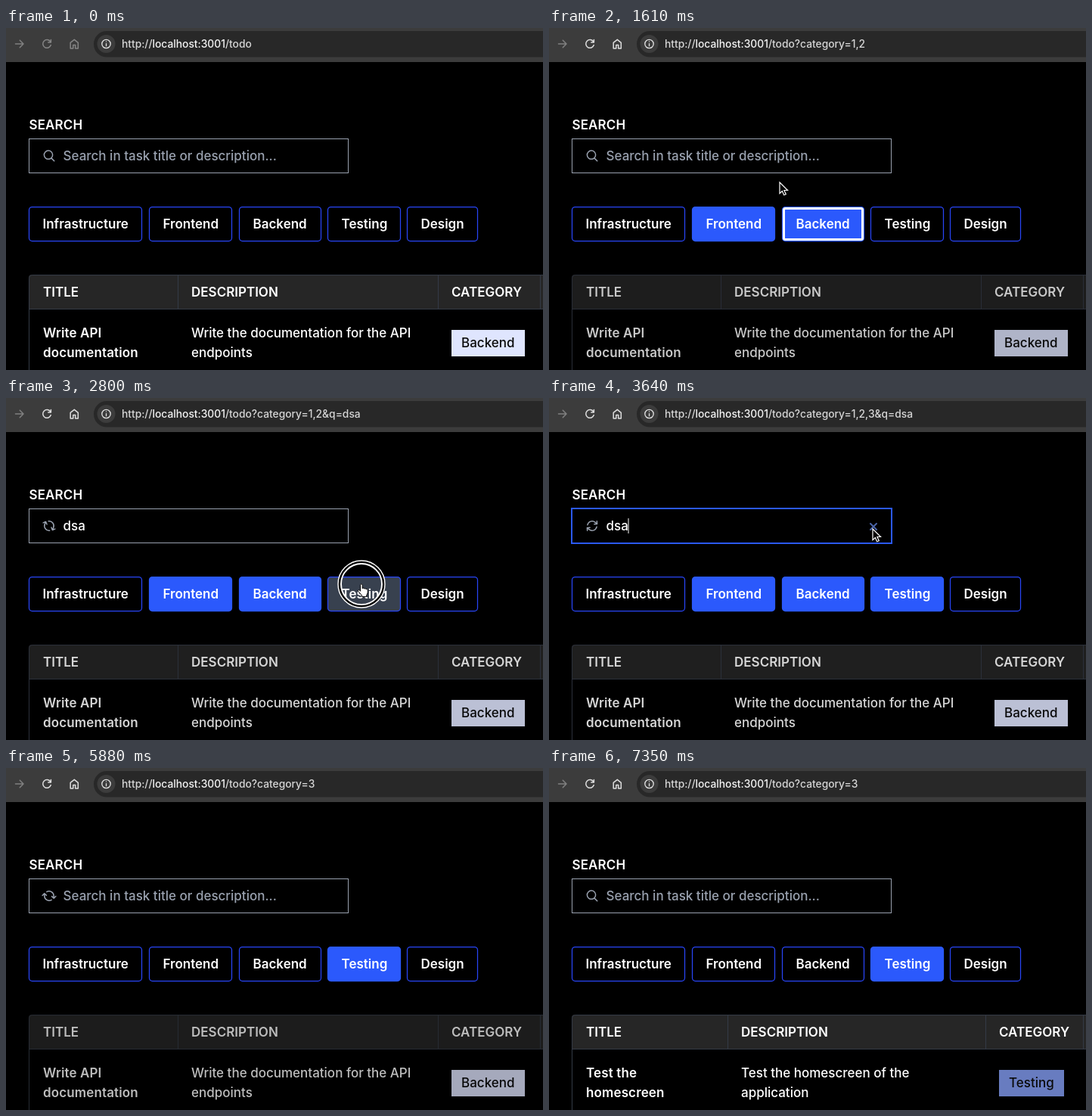
Animation of 710 by 452 pixels, one loop 8540 ms. Source, as an HTML page:

```html
<!DOCTYPE html>
<html lang="en">
<head>
<meta charset="utf-8">
<title>Todo filters</title>
<style>
  html, body { margin: 0; width: 100%; height: 100%; overflow: hidden; background: #000; }
  svg { display: block; width: 710px; height: 452px; }
  text { font: 500 17px Inter, sans-serif; fill: #fff; white-space: pre; }
  .url { font-size: 13.8px; fill: #d6d6d6; }
  .strong { font-weight: 600; }
  .bold { font-weight: 600; letter-spacing: .13px; }
  .hint { fill: #99a1af; }
  .line { fill: none; stroke-linecap: round; stroke-linejoin: round; }
</style>
</head>
<body>
<svg id="stage" viewBox="0 0 710 452">
  <rect width="710" height="45" fill="#3c3c3c"/>
  <rect x="116" y="4" width="640" height="34.5" rx="17.2" fill="#282828"/>
  <circle cx="132.5" cy="21" r="12" fill="#3c3c3c"/>
  <g class="line" stroke="#e3e3e3" stroke-width="1.3">
    <circle cx="132.5" cy="21" r="5.7"/>
    <path d="M132.5 20.6v3.2M132.5 18v.1"/>
  </g>
  <path class="line" stroke="#808080" stroke-width="1.5" d="M12.5 21h10.5M18.3 16.3l4.7 4.7-4.7 4.7"/>
  <g id="nav" class="line" stroke-width="1.5">
    <path d="M58.7 18A5.4 5.4 0 1 0 59.3 22.6M59.4 15.4v3.6h-3.6"/>
    <path d="M85.2 19.3v7.7h3.6v-4.6h2.9v4.6h3.6v-7.7l-5-4z"/>
  </g>
  <text class="url" x="153" y="26">http://<tspan fill="#f4f4f4">localhost:3001</tspan>/todo<tspan id="query"></tspan></text>

  <text class="bold" x="30.5" y="134">SEARCH</text>
  <rect id="field" fill="#000"/>
  <g class="line" stroke="#99a1af" stroke-width="2">
    <path id="lens" transform="translate(48 160) scale(.75)" d="m21 21-5.2-5.2A7.5 7.5 0 1 0 5.2 5.2a7.5 7.5 0 0 0 10.6 10.6"/>
    <path id="spinner" d="M16 9.35h5v-5M3 19.65v-5h5M3 14.65l3.2 3.2a8.25 8.25 0 0 0 13.8-3.7M4 9.85a8.25 8.25 0 0 1 13.8-3.7l3.2 3.2"/>
  </g>
  <text id="hint" class="hint" x="75.5" y="175">Search in task title or description...</text>
  <text id="typed" x="75.5" y="175"></text>
  <rect id="caret" y="159" width="1" height="20" fill="#fff"/>
  <path id="clear" class="line" stroke="#4a64a8" stroke-width="2" d="M425 166l8 8M433 166l-8 8"/>

  <g id="buttons"></g>
  <g id="table"></g>

  <g id="ring" fill="none">
    <circle r="29" stroke="#000" stroke-width="5"/>
    <circle r="31" stroke="#fff" stroke-width="1.4"/>
    <circle r="27" stroke="#fff" stroke-width="1.9"/>
  </g>
  <g id="pointer">
    <path id="arrow" d="M0 0v14.6l3.3-3.1 2.4 5.3 2.6-1.1-2.4-5.2h4.6z" fill="#000" stroke="#fff" stroke-width="1.2"/>
    <path id="hand" d="M-1.4 1.2C-1.4-.6 1.2-.6 1.2 1.2v4.6c.5-1 2.3-.9 2.5.4.7-.8 2.2-.5 2.4.6.9-.6 2.2 0 2.2 1.2 0 3.4-.2 4.6-1.6 6.6v2H.6v-1.6L-4.2 9.6c-.9-1.5.6-2.6 1.7-1.5l1.1 1.2z" fill="#fff" stroke="#000" stroke-width="1"/>
    <path id="beam" class="line" d="M-3-8q3 0 3 2.5V5.5q0 2.5-3 2.5M3-8q-3 0-3 2.5M0 5.5q0 2.5 3 2.5" stroke="#fff" stroke-width="1.3"/>
  </g>
</svg>
<script>
const LOOP = 8540, STEP = 70, PULSE = 2100, SPIN = 1050;
const LOAD_START = 1120, SPIN_START = 2380, LOADED = 7350;
const BLUE = '#2b59fc', OUTLINE = '#2845f6';
const $ = id => document.getElementById(id);
const set = (el, attrs) => { for (const k in attrs) el.setAttribute(k, attrs[k]); };
const show = (el, on) => set(el, { visibility: on ? 'visible' : 'hidden' });

function add(parent, tag, attrs, label) {
  const el = document.createElementNS('http://www.w3.org/2000/svg', tag);
  set(el, attrs);
  if (label) el.textContent = label;
  return parent.appendChild(el);
}

// Each entry holds from its time until the next one.
const queries = [[0, ''], [1050, '?category=1'], [1400, '?category=1,2'],
  [2590, '?category=1,2&q=dsa'], [2940, '?category=1,2,3&q=dsa'],
  [3990, '?category=1,2,3'], [4830, '?category=2,3'], [5250, '?category=3']];
const typing = [[0, ''], [2100, 'd'], [2240, 'ds'], [2310, 'dsa'], [3850, '']];
const focuses = [[0, ''], [910, 1], [1260, 2], [1820, 'field'], [2730, 3],
  [3430, 'field'], [4410, 1], [5040, 2]];
const clicks = [[560, 700], [910, 1050], [1260, 1400], [1820, 1960], [2730, 2870],
  [3430, 3500], [3780, 3920], [4410, 4480], [5040, 5180]];
const path = [[210, 338, 448], [560, 254, 256], [1050, 254, 256], [1260, 348, 256],
  [1400, 346, 252], [1610, 305, 204], [1750, 262, 172], [2380, 262, 172],
  [2730, 470, 246], [2940, 470, 246], [3360, 404, 172], [3500, 410, 172],
  [3640, 428, 173], [3920, 428, 173], [4340, 268, 256], [4480, 276, 254],
  [4760, 295, 252], [4970, 352, 256], [5180, 352, 256], [5320, 352, 429]];

const entryAt = (list, t) => list.filter(e => e[0] <= t).pop();
const at = (list, t) => entryAt(list, t)[1];

function pointAt(t) {
  const i = path.findIndex(p => p[0] > t);
  if (i < 1) return (i ? path[path.length - 1] : path[0]).slice(1);
  const [a, b] = [path[i - 1], path[i]];
  const p = (t - a[0]) / (b[0] - a[0]);
  const e = p * p * (3 - 2 * p);
  return [a[1] + (b[1] - a[1]) * e, a[2] + (b[2] - a[2]) * e];
}

const buttons = [['Infrastructure', 30, 150], ['Frontend', 189, 110], ['Backend', 308, 109],
  ['Testing', 425, 97], ['Design', 530, 94]].map(([label, x, w]) => {
  const g = $('buttons');
  const box = add(g, 'rect', { x: x + .5, y: 236.5, width: w - 1, height: 45, rx: 4, 'stroke-width': 1.25 });
  const focus = add(g, 'rect', { x: x + 2.5, y: 238.5, width: w - 5, height: 41, rx: 2,
    fill: 'none', stroke: '#fff', 'stroke-width': 3 });
  add(g, 'text', { class: 'strong', x: x + 18.5, y: 265 }, label);
  return { x, w, box, focus };
});

function makeTable(cols, title, text, tag, tagWidth, tagFill) {
  const g = add($('table'), 'g', {});
  const edge = { fill: 'none', stroke: '#343a46' };
  add(g, 'path', { d: 'M30 372v-42q0-4 4-4H710v46z', fill: '#262626' });
  add(g, 'path', { ...edge, d: 'M30.5 452V330.5q0-4 4-4H710M31 371.5H710' });
  for (const x of [cols[0] - 17.5, cols[1] - 17.5, 706.5])
    add(g, 'path', { ...edge, d: `M${x} 327v44` });
  ['TITLE', 'DESCRIPTION', 'CATEGORY'].forEach((label, i) =>
    add(g, 'text', { class: 'strong', x: [49, ...cols][i], y: 355 }, label));
  title.forEach((s, i) => add(g, 'text', { class: 'bold', x: 49, y: 409 + 26 * i }, s));
  text.forEach((s, i) => add(g, 'text', { x: cols[0], y: 409 + 26 * i }, s));
  add(g, 'rect', { x: cols[1], y: 399, width: tagWidth, height: 35, fill: tagFill });
  add(g, 'text', { x: cols[1] + 13, y: 422, style: 'fill:#0a0a0a' }, tag);
  return g;
}
const before = makeTable([245, 589], ['Write API', 'documentation'],
  ['Write the documentation for the API', 'endpoints'], 'Backend', 97, '#dfe5fe');
const after = makeTable([254, 595], ['Test the', 'homescreen'],
  ['Test the homescreen of the', 'application'], 'Testing', 86, '#687cc0');

function drawPointer(t, x, y, over) {
  const transform = `translate(${x.toFixed(1)} ${y.toFixed(1)})`;
  const visible = t >= 210 && t < 5390 && !(t >= 2100 && t < 2450);
  const inField = x > 30 && x < 453 && y > 146 && y < 192;
  const onClear = inField && x > 423 && x < 435;
  const kind = over >= 0 ? 'hand' : inField && !onClear ? 'beam' : 'arrow';
  for (const id of ['arrow', 'hand', 'beam']) show($(id), visible && id === kind);
  set($('pointer'), { transform });
  set($('ring'), { transform });
  show($('ring'), clicks.some(([a, b]) => t >= a && t < b));
}

function drawField(t, focused, since) {
  const value = at(typing, t);
  set($('field'), focused
    ? { x: 30, y: 146, width: 423, height: 46, stroke: BLUE, 'stroke-width': 2 }
    : { x: 30.5, y: 146.5, width: 422, height: 45, stroke: '#99a1af', 'stroke-width': 1 });
  $('typed').textContent = value;
  show($('hint'), !value);
  show($('clear'), focused && value);
  show($('caret'), focused && (t - since) % 1050 < 525);
  set($('caret'), { x: Math.round(75.5 + $('typed').getComputedTextLength()) - .5 });
  const spinning = t >= SPIN_START && t < LOADED;
  show($('lens'), !spinning);
  show($('spinner'), spinning);
  const angle = (t - 3640) / SPIN * 360 - 4;
  set($('spinner'), { transform: `translate(57 169) rotate(${angle}) scale(.75) translate(-12 -12)` });
}

function draw(t) {
  const [x, y] = pointAt(t);
  const query = at(queries, t);
  const chosen = (query.match(/\d/g) || []).map(Number);
  const [since, focus] = entryAt(focuses, t);
  const over = t < 210 || t >= 5390 ? -1 :
    buttons.findIndex(b => x >= b.x && x < b.x + b.w && y >= 236 && y < 282);

  set($('nav'), { stroke: t < 630 ? '#858585' : '#dedede' });
  $('query').textContent = query;
  drawField(t, focus === 'field', since);

  buttons.forEach((b, i) => {
    const on = chosen.includes(i), hover = i === over;
    set(b.box, {
      fill: on ? (hover ? '#2145d8' : BLUE) : hover ? '#38414f' : '#000',
      stroke: on ? BLUE : OUTLINE
    });
    show(b.focus, on && focus === i);
  });

  const done = t >= LOADED;
  const wave = (1 - Math.cos((t - LOAD_START) / PULSE * 2 * Math.PI)) / 2;
  before.style.display = done ? 'none' : '';
  after.style.display = done ? '' : 'none';
  before.style.opacity = t < LOAD_START ? 1 : 1 - .47 * wave;
  drawPointer(t, x, y, over);
}

const start = performance.now();
function tick(now) {
  const t = Math.max(0, now - start) % LOOP;
  draw(Math.floor(t / STEP) * STEP);
  requestAnimationFrame(tick);
}
draw(0);
requestAnimationFrame(tick);
</script>
</body>
</html>
```
